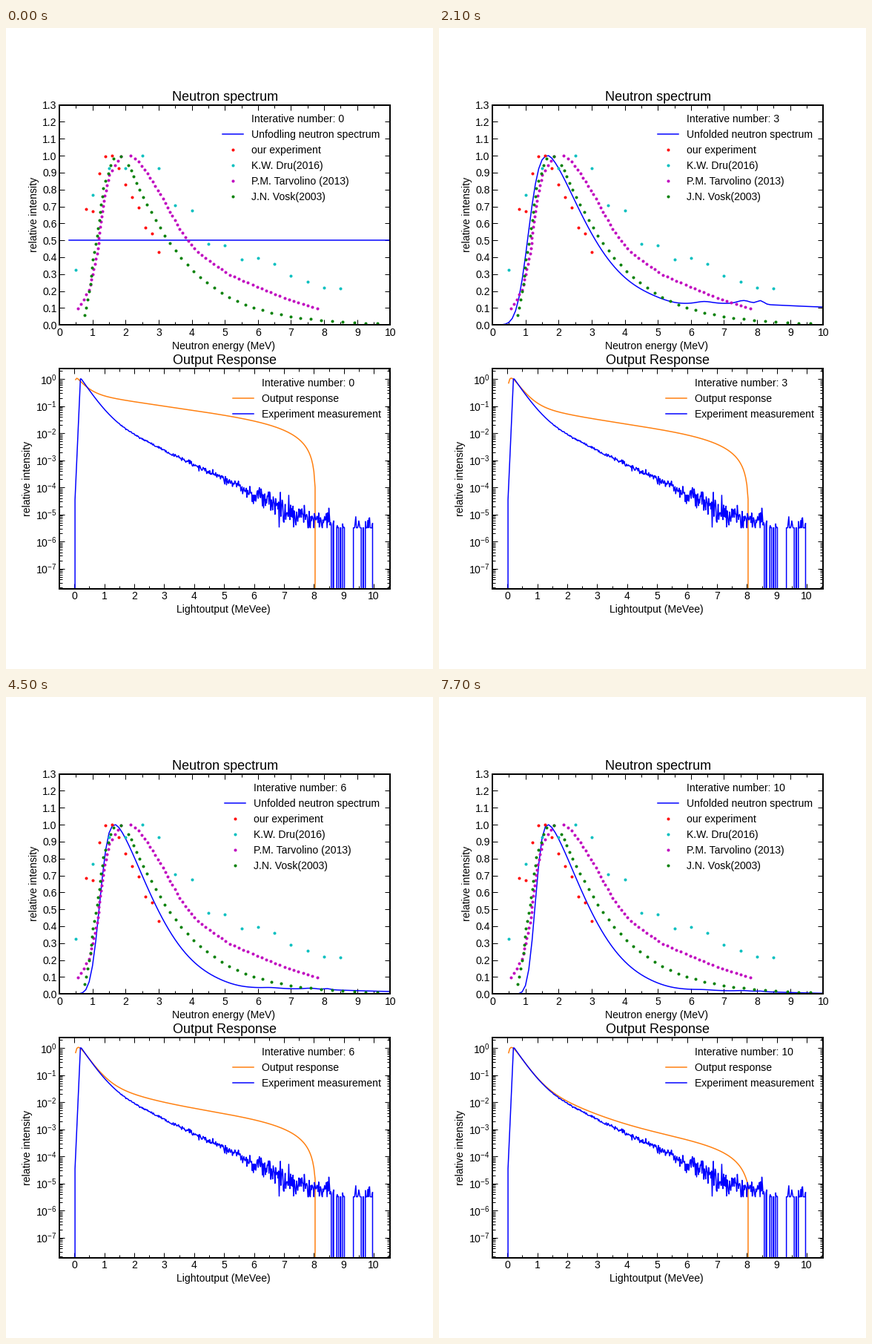
Recreate the animation shown at these times as a matplotlib script. Size 576 by 864 pixels, loop 8000 ms.

```python
import numpy as np
import matplotlib.pyplot as plt
from matplotlib.animation import FuncAnimation
from matplotlib.lines import Line2D
from matplotlib.ticker import LogLocator, MultipleLocator, NullFormatter

plt.rcParams.update({
    "font.family": "Liberation Sans", "font.size": 14, "axes.titlesize": 18,
    "mathtext.fontset": "custom", "mathtext.rm": "Liberation Sans",
    "mathtext.default": "regular", "axes.linewidth": 2, "lines.linewidth": 1.5,
    "xtick.direction": "in", "ytick.direction": "in",
    "xtick.top": True, "ytick.right": True,
    "xtick.major.size": 7, "ytick.major.size": 7,
    "xtick.minor.size": 4, "ytick.minor.size": 4,
    "xtick.major.width": 1, "ytick.major.width": 1,
    "xtick.minor.width": 1, "ytick.minor.width": 1,
    "legend.frameon": False, "legend.fontsize": 14,
})

energy = np.arange(0.3, 10.05, 0.1)
light = np.linspace(0.04, 8.04, 201)


def bell(x, mid, width):
    return np.exp(-((x - mid) / width) ** 2)


def spectrum(n):
    """Unfolded spectrum: a flat guess that sharpens with each iteration."""
    if n == 0:
        return np.full_like(energy, 0.5)
    x = energy
    rise = np.exp(-0.83 * n * np.maximum(1.7 - x, 0) ** 2.85)
    limit = np.exp(-0.5 * np.maximum(x - 1.7, 0) ** 1.45) + 0.015 * bell(x, 7, 2.5)
    fall = limit + (1 - limit) * 0.48 ** n
    ripple = (0.024 * bell(x, 6.4, 0.3) + 0.05 * bell(x, 7.6, 0.28)
              + 0.055 * bell(x, 8.1, 0.15) - 0.035 * bell(x, 5.6, 0.6)
              - 0.025 * bell(x, 10.3, 1.5))
    return np.minimum(rise * fall * np.exp(min(n, 4) * ripple), 1)


def decay(x):
    """Mean of the measured light output above its threshold."""
    return 10 ** (0.347 - 1.66 * x) + 10 ** (-1.02 - 0.54 * x) + 3e-6


def response(n):
    """Measured part plus a plateau that shrinks with each iteration."""
    x = light
    left = 0.6 ** n
    edge = (1 - (x / 8.06) ** 6.7) ** 1.25
    plateau = 10 ** (-0.545 - 0.155 * x - 0.2 * n * n / (n + 0.5)) * edge
    onset = 1 - np.exp(-x / (0.1 - 0.07 * left))
    y = ((1 - 0.5 * left) * decay(x) + plateau) * onset
    return np.r_[y, 0]


def measurement():
    """Steep onset, decay with counting noise, empty bins near the end."""
    rng = np.random.default_rng(8)
    x = np.arange(0, 9.99, 0.02)
    mean = np.minimum(np.minimum(10 ** (25 * x - 4.96), decay(x)), 1)
    shape = np.maximum(mean * 10 ** 5.1, 3.5)
    noise = rng.gamma(shape) / shape
    y = np.where(x < 1.5, mean, np.maximum(mean * noise, 3.2e-6))
    empty = np.repeat(rng.random(len(x) // 2), 2) < 0.2 * (x - 7.4).clip(0, 1.75)
    y[empty] = 0
    y[0] = y[-1] = 0
    return x, y


def spread(xk, yk, n):
    """n points at equal steps along a path, measured on screen."""
    s = np.r_[0, np.cumsum(np.hypot(np.diff(xk) * 44.6, np.diff(yk) * 228))]
    at = np.linspace(0, s[-1], n)
    return np.interp(at, s, xk), np.interp(at, s, yk)


def magenta_dots():
    rise = spread([.57, .92, 1.13, 1.33, 1.5, 1.85],
                  [.097, .217, .41, .72, .885, .995], 31)
    fall = spread([2.16, 2.38, 2.67, 3.1, 3.68, 4.15, 5.1, 6, 7, 7.79],
                  [1, .968, .893, .755, .55, .435, .3, .224, .145, .097], 52)
    return np.hstack([rise, fall])


def green_dots():
    rise = spread([.77, .92, 1, 1.16, 1.32, 1.61, 1.87],
                  [.057, .215, .366, .55, .803, .982, .998], 22)
    k = np.arange(37)
    x = 2.09 + 0.068 * k + 0.0042 * k * k
    return np.hstack([rise, (x, np.exp(-0.505 * (x - 1.95) ** 1.1))])


fig, (top, low) = plt.subplots(2, 1, figsize=(8, 12), dpi=72)
fig.subplots_adjust(left=0.125, right=0.9, bottom=0.125, top=0.88, hspace=0.2)

top.set(title="Neutron spectrum", xlim=(0, 10), ylim=(0, 1.3))
top.set_xlabel("Neutron energy (MeV)", x=0.4955)
top.yaxis.set_major_locator(MultipleLocator(0.1))
low.set(title="Output Response", xlim=(-0.5025, 10.5525))
low.set_xlabel("Lightoutput (MeVee)", x=0.4955)
low.set_yscale("log", nonpositive="clip")
low.set_ylim(10 ** -7.75, 10 ** 0.37)
low.yaxis.set_major_locator(LogLocator(10, numticks=20))
low.yaxis.set_minor_locator(LogLocator(10, subs=np.arange(2, 10), numticks=20))
low.yaxis.set_minor_formatter(NullFormatter())
for ax in (top, low):
    ax.set_ylabel("relative intensity")
    ax.xaxis.set_major_locator(MultipleLocator(1))
    ax.xaxis.set_minor_locator(MultipleLocator(0.5))

curve, = top.plot(energy, spectrum(0), "b")

red_y = [.685, .67, .894, .995, 1, .925, .828, .754, .693, .575, .539, .43]
cyan_y = [.325, .767, .925, .925, 1, .925, .708, .677, .478, .47, .387, .395,
          .361, .29, .256, .221, .215]
sets = [
    ("our experiment", "r", 0.8 + 0.2 * np.arange(12), red_y),
    ("K.W. Dru(2016)", "c", 0.5 + 0.5 * np.arange(17), cyan_y),
    ("P.M. Tarvolino (2013)", "m", *magenta_dots()),
    ("J.N. Vosk(2003)", "g", *green_dots()),
]
dots = [top.plot(x, y, ".", color=c, ms=6, label=name)[0]
        for name, c, x, y in sets]

folded, = low.plot(np.r_[light, 8.05], response(0), color="tab:orange")
measured, = low.plot(*measurement(), "b")
blank = Line2D([], [], ls="none")


def draw(i):
    n = 0 if i < 5 else 1 + (i - 5) // 8
    curve.set_ydata(spectrum(n))
    folded.set_ydata(response(n))
    count = f"Interative number: {n}"
    word = "Unfolded" if n else "Unfodling"
    top.legend([blank, curve] + dots,
               [count, word + " neutron spectrum"] + [d.get_label() for d in dots],
               loc="upper left", bbox_to_anchor=(0.471 if n else 0.464, 1))
    low.legend([blank, folded, measured],
               [count, "Output response", "Experiment measurement"],
               loc="lower left" if n == 1 else "upper right")
    return curve, folded


anim = FuncAnimation(fig, draw, frames=80, interval=100, repeat=True)
plt.show()
```
